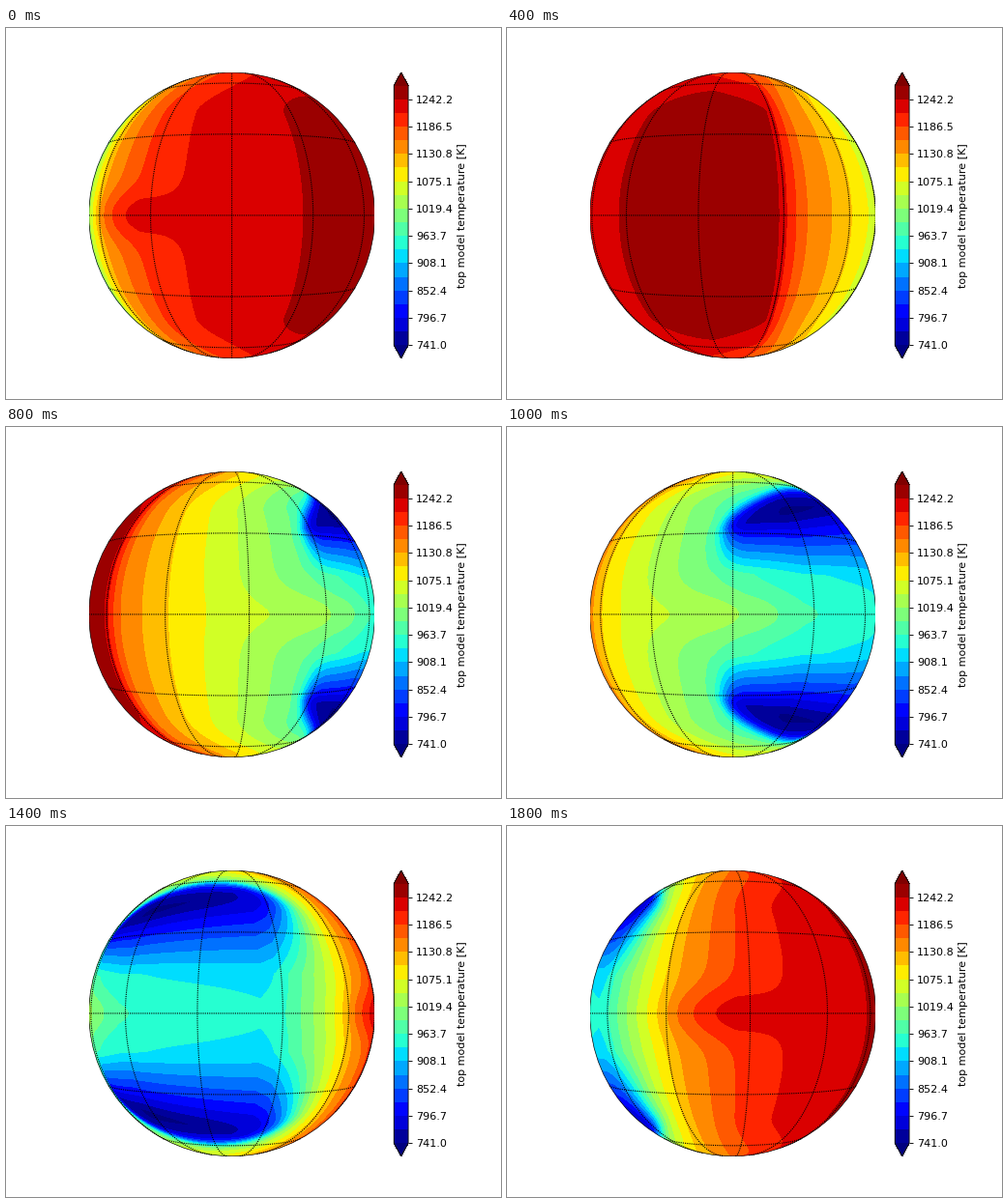
Recreate the animation shown at these times as a matplotlib script. Size 512 by 384 pixels, loop 2 s.

```python
import numpy as np
import matplotlib.pyplot as plt
from matplotlib.animation import FuncAnimation
from matplotlib.patches import Circle

W, H, DPI = 512, 384, 80
FRAMES, LOOP = 10, 2000
DIST = 6.61                       # viewer distance in planet radii
K = np.sqrt(DIST ** 2 - 1)
LEVELS = np.linspace(741, 1270, 20)
STEP = LEVELS[1] - LEVELS[0]

# Key points of the day and night curve: longitude, colour level.
CURVE = np.array([(60, 18.6), (88.3, 18), (92, 16.6), (99, 15), (121, 13), (159, 10),
                  (184, 8), (206, 7), (262, 6.6), (268, 7), (305, 14), (325, 16),
                  (343, 17), (386, 18)])


def bump(x, center, width):
    return np.exp(-((x - center) / width) ** 2)


def rise(x, center, width):
    """Smooth step from 0 to 1."""
    return 0.5 + 0.5 * np.tanh((x - center) / (2 * width))


def equator_warmth(lon, lat):
    along = (1.7 * bump(lon, 180, 27) + 0.85 * bump(lon, 235, 40)
             + 1.65 * bump(lon, 318, 20))
    return along * bump(lat, 0, 9)


def polar_mix(lon, lat, level):
    x = np.clip((lat - 40) / 35, 0, 1)
    polar = 14.3 + 2.7 * np.cos(np.radians(lon - 35))
    return level + x * x * (3 - 2 * x) * (polar - level)


def cold_vortex(lon, lat):
    span = np.clip(34 + (lon - 240) / 4, 18, 45)
    ramp = np.clip((lat - 14) / span, 0, 1)
    arch = 59 - 10 * ((lon - 238) / 41) ** 2
    ends = rise(lon, 176, 2.2) * rise(-lon, -283, 4)
    return 7.2 * ramp * ends * rise(-lat, -arch, 2)


def temperature(lon, lat):
    lat = abs(lat)
    level = np.interp(lon, *CURVE.T, period=360) + equator_warmth(lon, lat)
    level = polar_mix(lon, lat, level) - cold_vortex(lon, lat)
    # thin warm seam along the terminator
    level += 0.8 * bump(lon, 90.2, 0.45) * (lat < 53)
    return LEVELS[0] + STEP * level


def project(lon, lat):
    """Perspective view of the globe; the limb is the unit circle."""
    lon, lat = np.radians(lon), np.radians(lat)
    z = np.cos(lat) * np.cos(lon)
    seen = np.where(z >= 1 / DIST, K / (DIST - z), np.nan)
    return np.cos(lat) * np.sin(lon) * seen, np.sin(lat) * seen


def unproject(u, v):
    rho = np.hypot(u, v)
    shrink = np.minimum(1, 0.9999 / np.maximum(rho, 1e-9))
    u, v = u * shrink, v * shrink
    r2 = u ** 2 + v ** 2
    a = r2 / K ** 2
    z = (a * DIST + np.sqrt(1 - r2)) / (1 + a)
    scale = (DIST - z) / K
    return np.degrees(np.arctan2(u * scale, z)), np.degrees(np.arcsin(v * scale))


grid = np.linspace(-1, 1, 321)
REL_LON, LAT = unproject(*np.meshgrid(grid, grid))

fig = plt.figure(figsize=(W / DPI, H / DPI), dpi=DPI, facecolor="white")
side = 0.77 * H
ax = fig.add_axes([(381.44 - side) / W, 0.11, side / W, 0.77])
ax.set(xlim=(-1, 1), ylim=(-1, 1))
ax.axis("off")
limb = ax.add_patch(Circle((0, 0), 1, fc="none", ec="k", lw=0.6, zorder=3))

DOTS = dict(color="k", lw=1, ls=(0, (1, 1)), snap=False, zorder=2)
for parallel in range(-60, 61, 30):
    ax.plot(*project(np.linspace(-90, 90, 361), parallel), **DOTS)
meridians = [ax.plot([], [], **DOTS)[0] for _ in range(12)]


def fill(center):
    field = temperature((REL_LON + center) % 360, LAT)
    cs = ax.contourf(grid, grid, field, LEVELS, cmap="jet", extend="both", zorder=1)
    cs.set_clip_path(limb)
    return cs


shown = [fill(0)]
cax = fig.add_axes([401.28 / W, 0.11, side / 20 / W, 0.77])
bar = fig.colorbar(shown[0], cax=cax, ticks=LEVELS[::2], format="%.1f")
bar.minorticks_off()
bar.set_label("top model temperature [K]")


def draw(i):
    center = i * 360 / FRAMES
    shown.pop().remove()
    shown.append(fill(center))
    for n, line in enumerate(meridians):
        line.set_data(*project(n * 30 - center, np.linspace(-80, 80, 321)))
    return meridians


anim = FuncAnimation(fig, draw, frames=FRAMES, interval=LOOP / FRAMES,
                     init_func=lambda: meridians, repeat=True, repeat_delay=0)
plt.show()
```
